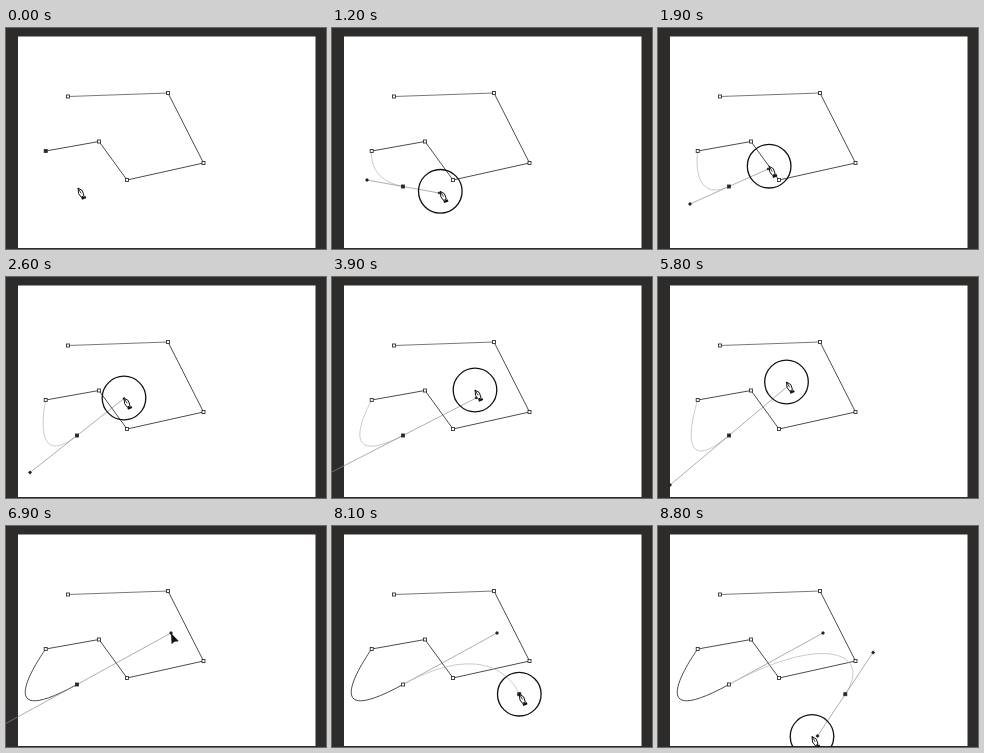
An HTML page that plays this animation: 320x221 px, repeating every 8900 ms.

```html
<!DOCTYPE html>
<html lang="en">
<head>
<meta charset="utf-8">
<title>Pen tool</title>
<style>
  html, body { margin: 0; width: 100%; height: 100%; overflow: hidden; background: #2e2c2b; }
  svg { display: block; width: 100vw; height: 100vh; }
  path, circle { fill: none; }
  .edge { stroke: #383838; stroke-width: .9; }
  .handle { stroke: #8c8c8c; stroke-width: .7; }
  .draft { stroke: #bdbdbd; stroke-width: .8; }
  .node { stroke: #333; stroke-width: .9; fill: #fff; }
  .node.active { fill: #222; }
  .dot { fill: #222; }
  .ring { stroke: #111; stroke-width: 1.3; }
</style>
</head>
<body>
<svg viewBox="0 0 320 221" preserveAspectRatio="none">
  <rect width="320" height="221" fill="#2e2c2b"/>
  <rect x="12" y="8.5" width="297.5" height="211.5" fill="#fff"/>
  <g id="drawing"></g>
  <circle id="ring" class="ring" r="21.8"/>
  <g id="pen">
    <path d="M0 0L4.3 2.6 6 7.6 3.3 9.2 .6 5.6Z" style="fill:#fff" stroke="#111"/>
    <path d="M0 0L3.2 5.4" stroke="#111" stroke-width=".8"/>
    <path d="M3.6 10.7L7.8 9" stroke="#111" stroke-width="2.4"/>
  </g>
  <path id="arrow" d="M0 0L.6 11.3 3.3 8.7 7.8 8.2Z" style="fill:#111"/>
</svg>
<script>
const LOOP = 8900, STEP = 100;
const PRESS_A = 300, RELEASE_A = 6800, PEN_BACK = 7600, PRESS_B = 8100;
const OUTLINE = [[62, 68.5], [162, 65], [197.5, 135], [121, 152], [93, 113.5], [39.7, 123]];
const START = OUTLINE[5], A = [71, 158.5], B = [187.3, 168.2], A_OUT = [165, 107];

// Cursor path: time, x, y
const CURSOR = [
  [0, 72, 160], [300, 71, 158.5], [900, 101, 163], [1100, 107, 165], [1200, 108.3, 163.3],
  [1400, 110.5, 161], [1800, 110, 141], [2500, 118, 121.5], [2600, 118, 121], [2700, 121, 118],
  [3600, 149.5, 119], [3800, 144, 121], [3900, 143, 113], [4200, 130, 100.5], [4500, 117, 115],
  [4900, 113, 119], [5300, 117, 116], [5700, 130, 109], [5800, 128.5, 105], [6200, 138, 79.5],
  [6500, 174, 96], [6800, 165, 107], [7600, 165, 107], [8100, 187.3, 168.2],
  [8400, 177, 183], [8700, 159.5, 210], [8800, 154, 210.5]
];

const byId = id => document.getElementById(id);
const drawing = byId('drawing'), ring = byId('ring'), pen = byId('pen'), arrow = byId('arrow');

function cursorAt(time) {
  const next = CURSOR.findIndex(key => key[0] > time);
  if (next < 0) return CURSOR.at(-1).slice(1);
  const [t0, x0, y0] = CURSOR[next - 1], [t1, x1, y1] = CURSOR[next];
  const k = (time - t0) / (t1 - t0);
  return [x0 + (x1 - x0) * k, y0 + (y1 - y0) * k];
}

const mirror = (p, c) => [2 * c[0] - p[0], 2 * c[1] - p[1]];
const path = (cls, d) => `<path class="${cls}" d="${d}"/>`;
const line = (cls, ...points) => path(cls, 'M' + points.join('L'));
const curve = (cls, p, c1, c2, q) => path(cls, `M${p}C${c1} ${c2} ${q}`);
const node = ([x, y], active) =>
  `<rect class="node${active ? ' active' : ''}" x="${x - 1.5}" y="${y - 1.5}" width="3" height="3"/>`;
const dot = ([x, y], r = 2) => path('dot', `M${x - r} ${y}l${r} ${-r} ${r} ${r} ${-r} ${r}z`);

const outline = `<g opacity=".75">${line('edge', OUTLINE[0], OUTLINE[1])}</g>`
  + line('edge', ...OUTLINE.slice(1));

function draw(time) {
  const cursor = cursorAt(time);
  // The handle trails the cursor by one step.
  const dragged = cursorAt(Math.max(time - STEP, 0));
  const hasA = time >= PRESS_A, hasB = time >= PRESS_B;
  const draggingA = hasA && time < RELEASE_A;
  let art = outline;

  if (hasA) {
    const out = draggingA ? (time === PRESS_A ? A : dragged) : A_OUT;
    const inward = mirror(out, A);
    art += curve(draggingA ? 'draft' : 'edge', START, START, inward, A);
    art += line('handle', hasB ? A : inward, out) + dot(out, draggingA ? 1.5 : 2);
    if (!hasB) art += dot(inward);
  }
  if (hasB) {
    const out = time === PRESS_B ? B : dragged;
    const inward = mirror(out, B);
    art += curve('draft', A, A_OUT, inward, B);
    art += line('handle', inward, out) + dot(inward) + dot(out);
  }
  art += OUTLINE.map((p, i) => node(p, i === 5 && !hasA)).join('');
  if (hasA) art += node(A, !hasB);
  if (hasB) art += node(B, true);
  drawing.innerHTML = art;

  const showArrow = time >= RELEASE_A && time < PEN_BACK;
  const place = (shape, shown) => {
    shape.setAttribute('transform', `translate(${cursor})`);
    shape.style.display = shown ? '' : 'none';
  };
  place(ring, draggingA || hasB);
  place(pen, !showArrow);
  place(arrow, showArrow);
}

const begin = performance.now();
function tick() {
  const time = (performance.now() - begin) % LOOP;
  draw(Math.floor(time / STEP) * STEP);
  requestAnimationFrame(tick);
}
tick();
</script>
</body>
</html>
```
